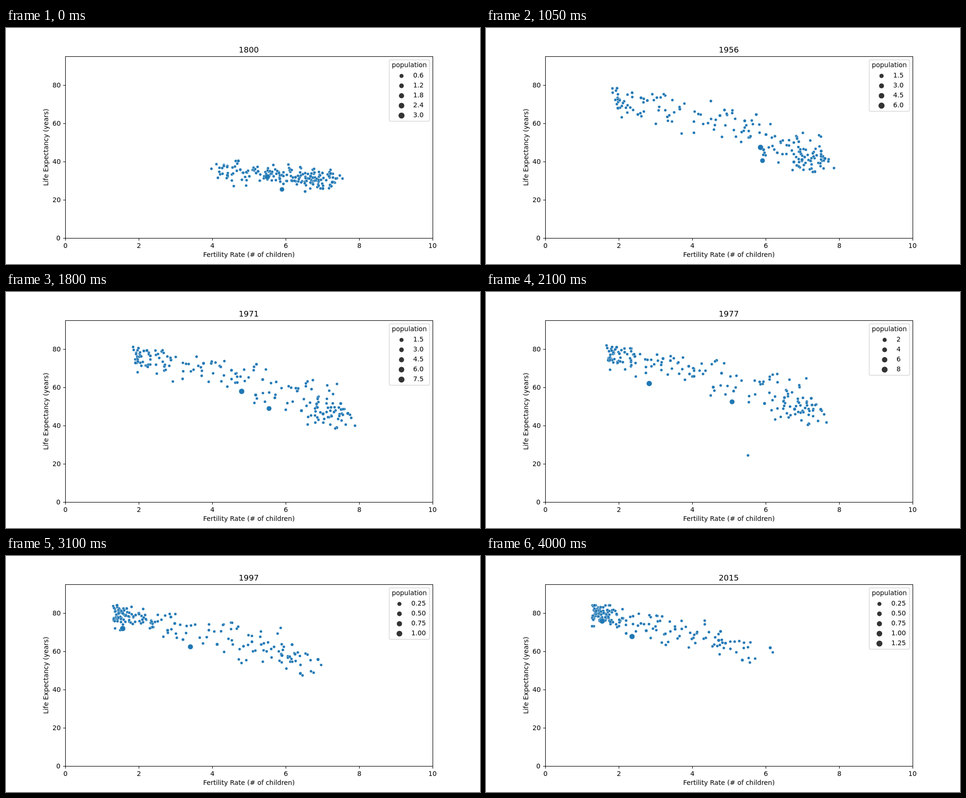
An HTML page with a canvas that plays this animation: 1000 px wide and 500 px high, repeating every 4.05 s.

```html
<!DOCTYPE html>
<html lang="en">
<head>
<meta charset="utf-8">
<title>Fertility and life expectancy</title>
<style>
  html, body { margin: 0; width: 100%; height: 100%; overflow: hidden; background: #fff; }
  canvas { display: block; }
</style>
</head>
<body>
<canvas id="chart" width="1000" height="500"></canvas>
<script>
const ctx = document.getElementById('chart').getContext('2d');
const FRAME_MS = 50, FRAMES = 81;
const PT = 100 / 72;
const LEFT = 125, RIGHT = 900, TOP = 60, BOTTOM = 445;
const toX = fertility => LEFT + fertility * 77.5;
const toY = life => BOTTOM - life * (BOTTOM - TOP) / 95;

function seededRandom(seed) {
  return () => {
    seed = (seed + 0x6D2B79F5) | 0;
    let t = Math.imul(seed ^ (seed >>> 15), seed | 1);
    t ^= t + Math.imul(t ^ (t >>> 7), t | 61);
    return ((t ^ (t >>> 14)) >>> 0) / 4294967296;
  };
}
const random = seededRandom(1800);
const gauss = () => (random() + random() + random() + random() - 2) * 1.73;
const logistic = x => 1 / (1 + Math.exp(-x));
const bell = x => Math.exp(-x * x);

// Each country passes from high to low fertility and from short to long lives,
// the earlier the lower its rank (0 to 1).
function makeCountry(rank) {
  const shift = .22 * gauss();
  return {
    high: 4.1 + 5.2 * rank - 2.1 * rank ** 2 + shift,
    low: 1.4 + .1 * rank + shift / 2,
    fertMid: 1910 + 165 * rank - 45 * rank ** 2 + 5 * gauss(),
    fertWidth: 15,
    base: 35 - 5 * rank + 2.6 * gauss(),
    gain: 47,
    lifeMid: 1918 + 80 * rank + 9 * gauss(),
    lifeWidth: 17 + 50 * (rank - .45) ** 2,
    share: () => 0
  };
}

const COUNT = 182;
const countries = Array.from({ length: COUNT }, (_, i) => makeCountry((i + .5) / COUNT));
for (const c of countries) {
  const share = .12 * random() ** 8;
  c.share = () => share;
}

const largest = {
  high: 5.5, low: 1.55, fertMid: 1973.5, fertWidth: 3,
  base: 32, gain: 46, lifeMid: 1967, lifeWidth: 16,
  share: () => 1,
  shock: { year: 1960, depth: 18, width: 1.5 }
};
const second = {
  high: 5.9, low: 1.6, fertMid: 1992, fertWidth: 15,
  base: 25.4, gain: 47, lifeMid: 1971, lifeWidth: 20,
  share: year => .65 + .29 * ((year - 1800) / 215) ** 4
};
countries.push(largest, second);

function addShock(rank, year, depth, width) {
  countries[Math.floor(rank * COUNT)].shock = { year, depth, width };
}
addShock(.6, 1977, 40, 2.5);
addShock(.9, 1994, 38, 1);
addShock(.75, 2010, 32, .5);

const peakPopulation = year => 3.2 + .013 * (year - 1800) + 7.8 * logistic((year - 1978) / 11);

function stateAt(c, year) {
  const boom = .55 * bell((year - 1966) / 16);
  const fert = c.low + (c.high - c.low) * logistic((c.fertMid - year) / c.fertWidth) + boom;
  let life = c.base + c.gain * logistic((year - c.lifeMid) / c.lifeWidth);
  if (c.shock) life -= c.shock.depth * bell((year - c.shock.year) / c.shock.width);
  return { fert, life: Math.min(84, life), share: c.share(year) };
}

const radius = share => Math.sqrt(18 + 54 * share) / 2 * PT;

function dot(x, y, r, fill) {
  ctx.beginPath();
  ctx.arc(x, y, r, 0, 2 * Math.PI);
  ctx.fillStyle = fill;
  ctx.fill();
}

const setFont = size => { ctx.font = `${size * PT}px "DejaVu Sans", sans-serif`; };

// Starts the text on a whole pixel; anchor 0, .5 or 1 is its left, middle or right.
function text(str, x, y, anchor = .5, size = 10) {
  setFont(size);
  ctx.fillStyle = '#000';
  ctx.fillText(str, Math.round(x - ctx.measureText(str).width * anchor), y);
}

function line(x1, y1, x2, y2) {
  ctx.beginPath();
  ctx.moveTo(x1, y1);
  ctx.lineTo(x2, y2);
  ctx.stroke();
}

function drawAxes(year) {
  ctx.strokeStyle = '#000';
  ctx.lineWidth = 1.11;
  ctx.strokeRect(LEFT + .5, TOP + .5, RIGHT - LEFT, BOTTOM - TOP);
  for (let f = 0; f <= 10; f += 2) {
    const x = toX(f);
    line(x + .5, BOTTOM + .5, x + .5, BOTTOM + 5.4);
    text(f, x, 466);
  }
  for (let l = 0; l <= 80; l += 20) {
    const y = Math.round(toY(l));
    line(LEFT - 4.4, y + .5, LEFT + .5, y + .5);
    text(l, 115.3, y + 5, 1);
  }
  text(year, 512.5, 52, .5, 12);
  text('Fertility Rate (# of children)', 512.5, 485);
  ctx.save();
  ctx.translate(89, 252.5);
  ctx.rotate(-Math.PI / 2);
  text('Life Expectancy (years)', 0, 0);
  ctx.restore();
}

function drawLegend(peak) {
  const step = [.6, .8, 1, 1.5, 2, 2.5].find(s => s >= peak / 6);
  const count = Math.floor(peak / step);
  const unit = step * count >= 10 ? 10 : 1;
  const decimals = (String(step / unit).split('.')[1] || '').length;

  ctx.beginPath();
  ctx.roundRect(808.5, 67.5, 85, 25 + 21 * count, 2.8);
  ctx.fillStyle = 'rgba(255,255,255,.8)';
  ctx.fill();
  ctx.strokeStyle = 'rgba(204,204,204,.8)';
  ctx.lineWidth = 1.39;
  ctx.stroke();

  text('population', 851, 83);
  for (let i = 1; i <= count; i++) {
    const label = (i * step / unit).toFixed(decimals);
    const x = 851 - (38.9 + ctx.measureText(label).width) / 2 + 13.9;
    const y = 80.5 + 21 * i;
    dot(x, y, radius(i * step / peak) + .6, '#333');
    text(label, x + 25, y + 3.5, 0);
  }
}

function draw(frame) {
  const year = frame <= 15 ? 1800 + 10 * frame : 1935 + frame;
  ctx.fillStyle = '#fff';
  ctx.fillRect(0, 0, 1000, 500);
  for (const country of countries) {
    const { fert, life, share } = stateAt(country, year);
    dot(toX(fert), toY(life), radius(share), '#1f77b4');
    ctx.strokeStyle = '#fff';
    ctx.lineWidth = .47;
    ctx.stroke();
  }
  drawAxes(year);
  drawLegend(peakPopulation(year));
}

const start = performance.now();
function tick() {
  draw(Math.floor((performance.now() - start) / FRAME_MS) % FRAMES);
  requestAnimationFrame(tick);
}
tick();
</script>
</body>
</html>
```
